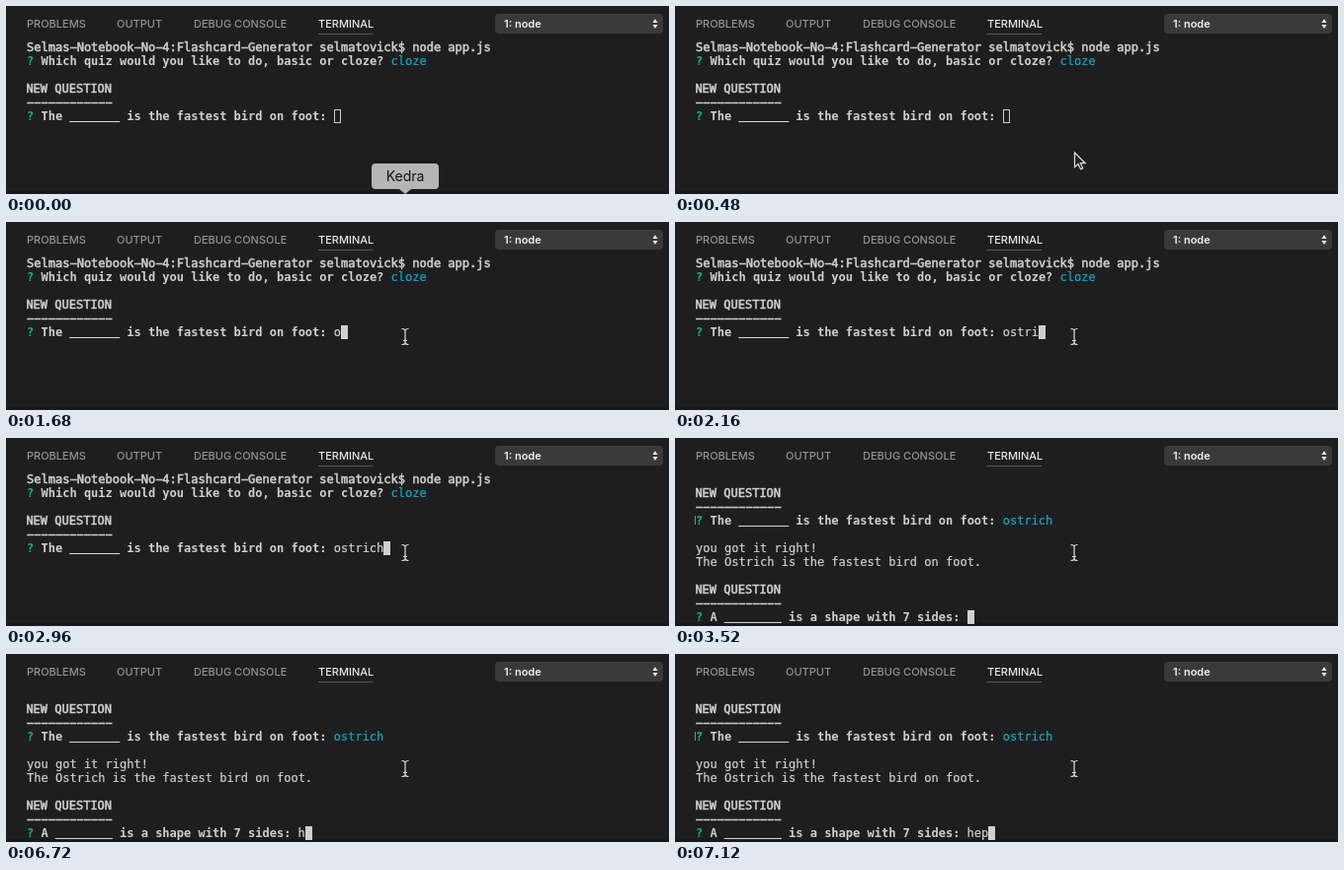
Write an HTML page with a canvas that moves like this. It is 671 px wide and 191 px high and loops after 8 s.

```html
<!DOCTYPE html>
<html lang="en">
<head>
<meta charset="utf-8">
<title>Flashcard quiz in a terminal</title>
<style>
html, body { margin: 0; width: 100%; height: 100%; overflow: hidden; background: #1e1e1e; }
canvas { display: block; }
</style>
</head>
<body>
<canvas id="stage" width="671" height="191"></canvas>
<script>
const c = document.getElementById('stage').getContext('2d');
const LOOP = 8000, LEFT = 21.1, CHAR = 7.224;
const MONO = '12px "DejaVu Sans Mono", monospace';
const UI = 'Inter, sans-serif';
const GREY = '#d0d0d0', CYAN = '#14a7cc', GREEN = '#0dbc79';
const ENTER = 3520;

// Time at which each letter of an answer is typed
const first = { word: 'ostrich', times: [1680, 1840, 1920, 2000, 2160, 2800, 2960] };
const second = { word: 'hep', times: [6720, 6960, 7120] };
const typed = (a, t) => a.word.slice(0, a.times.filter(s => t >= s).length);

function text(s, x, y, color, font, thicken = 0) {
  c.font = font;
  c.fillStyle = c.strokeStyle = color;
  c.fillText(s, x, y);
  if (!thicken) return;
  c.lineWidth = thicken;
  c.strokeText(s, x, y);
}

function rect(x, y, w, h, color) {
  c.fillStyle = color;
  c.fillRect(x, y, w, h);
}

function pill(x, y, w, h, r, color) {
  c.fillStyle = color;
  c.beginPath();
  c.roundRect(x, y, w, h, r);
  c.fill();
}

function shape(points, color) {
  c.beginPath();
  points.forEach(([x, y]) => c.lineTo(x, y));
  c.closePath();
  c.fillStyle = color;
  c.fill();
}

const baseline = row => 46 + row * 14;
const column = n => LEFT + n * CHAR;

// Hyphens are drawn with the wider minus glyph
function line(row, s, { col = 0, color = GREY, bold = false, thicken = 0.2 } = {}) {
  const font = (bold ? 'bold ' : '') + MONO;
  text(s.replaceAll('-', '\u2212'), column(col), baseline(row), color, font, bold ? 0 : thicken);
}

// The blank to fill in sits a little higher than the font's underscore
function prompt(row, question, answer, color) {
  const col = question.length + 3;
  line(row, '?', { color: GREEN, bold: true });
  line(row, question.replaceAll('_', ' '), { col: 2, bold: true });
  line(row - 0.09, question.replace(/[^_]/g, ' '), { col: 2, thicken: 0.6 });
  line(row, answer, { col, color });
  return col + answer.length;
}

function heading(row) {
  line(row, 'NEW QUESTION', { col: -0.1, thicken: 0.55 });
  line(row + 1, '------------', { col: -0.05, thicken: 0.55 });
}

function caret(row, col, focused) {
  const x = Math.round(column(col)), y = 35 + row * 14;
  if (focused) return rect(x, y, 7, 14, GREY);
  c.strokeStyle = GREY;
  c.lineWidth = 1;
  c.strokeRect(x + 0.5, y + 0.5, 6, 13);
}

function panel() {
  rect(0, 0, 671, 191, '#1e1e1e');
  rect(0, 188, 671, 3, '#17181b');
  [['PROBLEMS', 21], ['OUTPUT', 112], ['DEBUG CONSOLE', 190], ['TERMINAL', 316]].forEach(([s, x], i) =>
    text(s, x, 22, i === 3 ? '#e7e7e7' : '#939393', '500 11px ' + UI));
  rect(316, 28, 55, 1, '#5a5a5a');
  pill(495, 8, 170, 20, 4, '#3a3a3a');
  text('1: node', 504, 22, '#f0f0f0', '600 11px ' + UI);
  shape([[654.5, 17], [657, 13], [659.5, 17]], '#e8e8e8');
  shape([[654.5, 19], [657, 23], [659.5, 19]], '#e8e8e8');
}

function terminal(t) {
  const bird = 'The _______ is the fastest bird on foot:';
  if (t < ENTER) {
    line(0, 'Selmas-Notebook-No-4:Flashcard-Generator selmatovick$ node app.js', { thicken: 0.55 });
    prompt(1, 'Which quiz would you like to do, basic or cloze?', 'cloze', CYAN);
    heading(3);
    caret(5, prompt(5, bird, typed(first, t), GREY), t >= 1040);
    return;
  }
  heading(1);
  prompt(3, bird, first.word, CYAN);
  if (t < 6720 || t >= 7120) rect(20, 79, 1, 9, '#8a8a8a');
  line(5, 'you got it right!');
  line(6, 'The Ostrich is the fastest bird on foot.');
  heading(8);
  caret(10, prompt(10, 'A ________ is a shape with 7 sides:', typed(second, t), GREY), true);
}

function tooltip() {
  pill(370, 160, 68, 26, 4, '#b5b5b5');
  shape([[398, 186], [410, 186], [404, 191]], '#b5b5b5');
  c.textAlign = 'center';
  text('Kedra', 404, 178, '#111', '14px ' + UI);
  c.textAlign = 'left';
}

const arrow = new Path2D('M0.5 0.8V15.5L4 12.3L6.5 17.6L8.8 16.6L6.4 11.5H11.2Z');
const beam = new Path2D('M-3.5 -8Q0 -8 0 -6Q0 -8 3.5 -8M0 -6V6M-3.5 8Q0 8 0 6Q0 8 3.5 8M-2 4H2');

function pointer(t) {
  if (t < 400) return;
  c.save();
  c.strokeStyle = '#dedede';
  c.lineWidth = 1.2;
  if (t < 1040) {
    const p = Math.min(1, Math.floor((t - 320) / 80) / 6);
    c.translate(404, 114 + 77 * (1 - p) ** 2);
    c.fillStyle = '#222';
    c.fill(arrow);
    c.stroke(arrow);
  } else {
    c.translate(...(t < 1120 ? [421, 107] : [404, 116.5]));
    c.stroke(beam);
  }
  c.restore();
}

function draw(now) {
  const t = now % LOOP;
  panel();
  terminal(t);
  if (t < 320) tooltip();
  pointer(t);
}

const start = performance.now();
function tick() {
  draw(performance.now() - start);
  requestAnimationFrame(tick);
}
tick();
</script>
</body>
</html>
```
